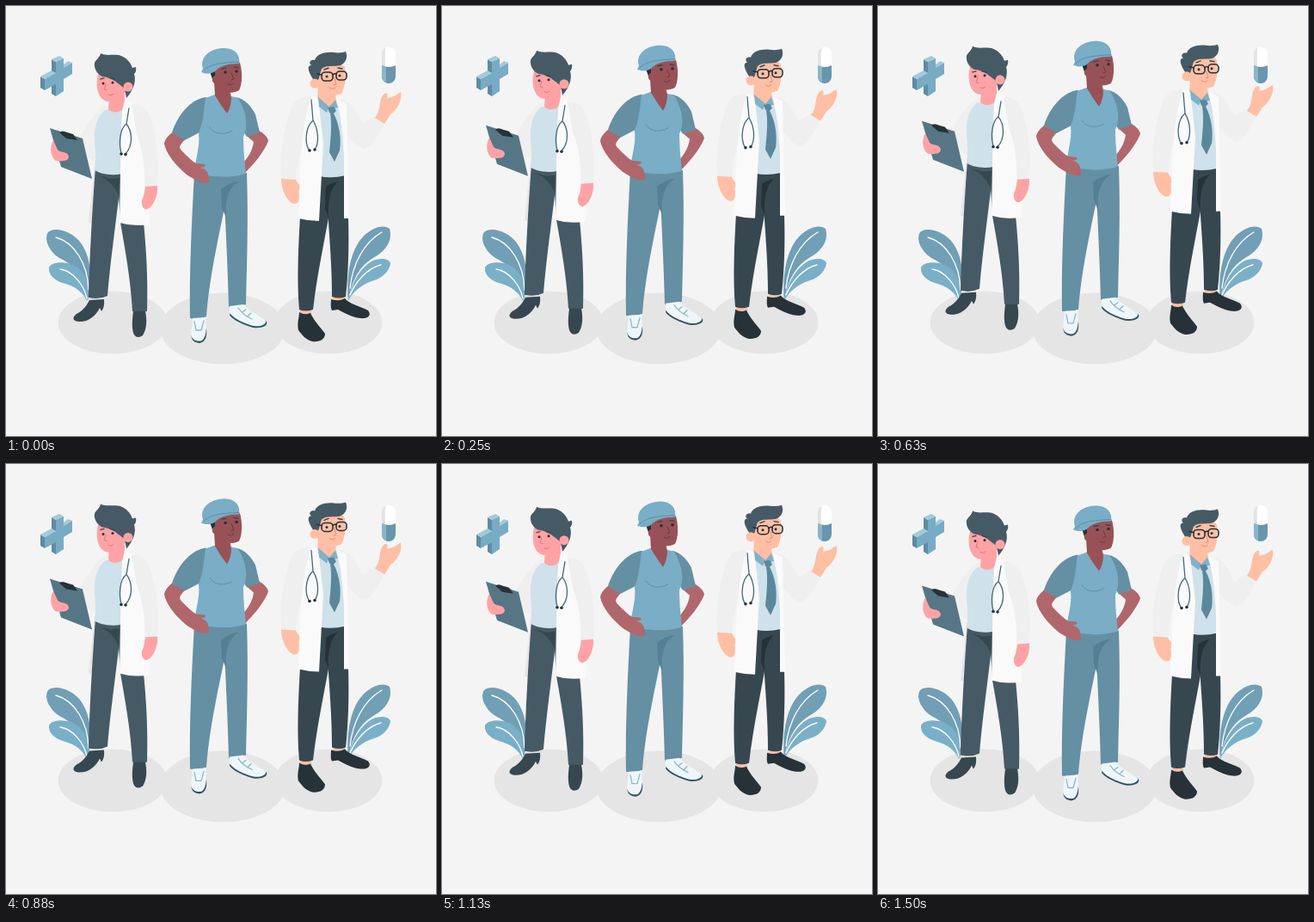
Animation, 500 px wide and 500 px high, one loop 1540 ms. Source, as an HTML page:

```html
<!DOCTYPE html>
<html lang="en">
<head>
<meta charset="utf-8">
<title>Medical team</title>
<style>
  html, body { margin: 0; height: 100%; overflow: hidden; background: #f4f4f4; }
  svg { display: block; width: 100vw; height: 100vh; }
  .line { fill: none; stroke-linecap: round; stroke-linejoin: round; }
  .vein { stroke: #fff; stroke-width: 1.3; }
  .tube { stroke: #44697b; stroke-width: 1.3; }
  .ink { fill: #263238; }
  .pink { fill: #fea3a5; }
  .brown { fill: #985257; }
  .arm { fill: #b0676b; }
  .peach { fill: #ffbfa5; }
  .coat { fill: #fafafa; }
  .sleeve { fill: #efefef; }
  .slate { fill: #465a65; }
  .navy { fill: #37474f; }
  .scrub { fill: #7aadc6; }
  .denim { fill: #658fa3; }
  .shirt { fill: #cfe1ea; }
</style>
</head>
<body>
<svg viewBox="0 0 500 500">
  <g fill="#e5e5e5">
    <ellipse cx="124" cy="368" rx="63.500" ry="36.500"/>
    <ellipse cx="252" cy="375" rx="72.500" ry="41.500"/>
    <ellipse cx="375" cy="368" rx="62.500" ry="36.500"/>
  </g>

  <g id="plants" fill="#719fb5">
    <path d="M95 343C100 320 100 295 88 277C78 262 57 256 49 263C43 272 52 288 64 294C82 303 92 318 95 343Z"/>
    <path fill="#7aafc8" d="M94 343C100 325 92 308 78 301C66 296 52 298 50 304C49 312 56 319 66 322C82 326 90 334 94 343Z"/>
    <path d="M398 343C395 310 402 285 412 272C425 256 440 254 446 259C450 272 442 284 430 291C410 302 402 320 398 343Z"/>
    <path fill="#7aafc8" d="M398 343C402 320 412 305 425 297C436 292 445 294 447 299C446 308 438 316 428 319C412 324 402 334 398 343Z"/>
    <path class="line vein" d="M58 269C80 275 95 300 96 330M63 306C78 308 91 325 94 340M437 263C416 275 403 300 400 328M436 301C420 305 407 320 400 336"/>
  </g>

  <g id="cross">
    <path fill="#5d8ca3" d="M53 62L58 65V78L53 76ZM40 82L45 85V98L40 95V82ZM53 91L58 90V105L53 102Z"/>
    <path fill="#a3cadb" d="M53 62L62 58L67 61L58 65ZM40 82L53 75L58 78L45 85ZM67 72L67 68L72 64L77 66Z"/>
    <path fill="#78abc4" d="M58 65L67 61V72L77 66V79L67 85V99L58 105V91L45 98V85L58 78Z"/>
  </g>

  <g id="pill">
    <path fill="#fff" d="M437 72V56A8 8 0 0 1 453 56V72Z"/>
    <path fill="#e1e3e4" d="M437 70V56Q437 50 442 49Q440 52 441 71Z"/>
    <path fill="#6796ad" d="M437 69Q445 73 453 69V82A8 8 0 0 1 437 82Z"/>
    <path fill="#8ab6ca" d="M437 69L442 71V89Q437 87 437 82Z"/>
  </g>

  <g class="person">
    <path fill="#e5e5e5" d="M103 185L96 252L104 255L112 195Z"/>
    <path class="slate" d="M104 188L134 190L132 215C127 258 121 300 118 337Q108 342 96 339C97 300 100 240 104 188Z"/>
    <path class="slate" d="M120 193L152 190C160 240 166 300 164 355Q155 357 147 355C145 318 138 280 133 252L130 205Z"/>
    <path class="navy" d="M108 197L121 201L132 200L131 220Q124 204 108 197Z"/>
    <path class="navy" d="M97 342L114 341Q115 350 111 355L109 351C104 361 95 368 84 367C77 366 77 362 82 358C90 354 94 348 97 342ZM148 355L162 355C164 365 164 375 159 383C155 386 150 386 148 380C146 372 147 363 148 355Z"/>
    <path class="sleeve" d="M119 115C108 117 100 130 86 152L93 175L104 182L113 150Z"/>
    <path class="shirt" d="M115 121L142 116L135 195C122 198 110 195 103 191C106 172 102 160 103 148C104 136 108 127 115 121Z"/>
    <path class="pink" d="M120 106L138 102L138 117C133 125 123 125 119 120Z"/>
    <path class="coat" d="M138 109L156 118L166 200L167 254Q148 257 132 252C133 210 133 160 135 122Z"/>
    <path class="sleeve" d="M146 114C158 114 166 121 169 134C175 155 179 180 176 209L161 211C162 190 159 165 152 150Z"/>
    <path class="pink" d="M162 210L176 209C177 220 172 232 165 236C160 238 157 232 158 226C161 220 161 215 162 210Z"/>
    <path class="line tube" d="M143 119L140 137C132 143 131 160 134 171M140 137C147 146 148 162 139 172"/>
    <circle class="ink" cx="134" cy="172" r="1.800"/><circle class="ink" cx="139" cy="172.500" r="1.800"/>
    <path fill="#567686" d="M51 142L89 154L100 201L64 187Z"/>
    <path class="ink" d="M62 147Q65 144 71 147L78 149L83 156L70 154Z"/>
    <path class="pink" d="M55 156C50 165 52 176 58 180C66 181 73 180 73 175C71 168 63 171 60 167Z"/>
    <path class="pink" d="M108 76C106 82 105 88 106 95C107 104 112 111 119 111C128 110 136 106 140 98L139 76Z"/>
    <path class="slate" d="M110 55C117 59 126 55 134 58C141 61 145 66 147 72L151 71Q152 76 149 79C152 89 147 99 140 107L138 96L133 92C128 88 122 83 112 82C106 79 102 73 103 66C105 62 109 60 110 55Z"/>
    <circle class="pink" cx="142" cy="94" r="5.500"/>
    <path class="line" stroke="#37474f" stroke-width="1.300" d="M110 85l4-1M121 84l5 1"/>
    <path class="line" stroke="#d87980" d="M116 91l-2 6 3 1M119 103q4 2 6-1"/>
    <circle class="ink" cx="113" cy="90" r="1.500"/><circle class="ink" cx="124" cy="89" r="1.500"/>
  </g>

  <g class="person">
    <path class="arm" d="M291 143C298 147 304 151 305 157C300 170 288 184 278 194L277 181C284 173 287 165 288 158L280 151Z"/>
    <path class="denim" d="M266 106C278 107 286 118 290 126L295 147L280 152L272 140Z"/>
    <path class="denim" d="M219 194L258 198L256 224C249 262 237 310 233 361Q224 365 214 363C213 310 216 250 219 194Z"/>
    <path class="denim" d="M248 196L280 194C282 250 280 300 279 347Q269 351 259 350C258 310 256 270 254 225Z"/>
    <path fill="#557f94" d="M271 204Q260 205 250 213L251 234L256 246Q253 214 271 204Z"/>
    <path fill="#315365" d="M216 378L233 376C234 384 232 391 225 392C217 391 214 387 216 378ZM261 356L303 367C305 372 297 375 288 374C276 371 262 364 260 359Z"/>
    <path fill="#eff6f9" d="M217 363L232 362C233 372 234 384 228 389C222 391 216 388 215 382C215 376 217 370 217 363ZM260 349L276 347C284 356 296 360 302 367C302 371 295 373 288 372C276 369 262 362 260 356Z"/>
    <path class="line" stroke="#8cb8cc" stroke-width="1.300" d="M219 367l2 10h6l3-11M270 351q5 8 16 13M275 356l4-3M281 361l4-4"/>
    <path class="denim" d="M233 106C215 108 200 126 193 147Q200 153 206 157L229 145Z"/>
    <path class="scrub" d="M232 107L243 103L257 123L262 105L270 107C276 118 284 135 276 152C276 170 278 184 279 195C262 200 242 200 219 194C220 178 226 164 224 148C231 130 230 116 232 107Z"/>
    <path class="line" stroke="#5f91aa" d="M237 141C241 149 253 151 263 145"/>
    <path class="brown" d="M242 88L260 98L262 106Q262 117 257 125Q250 116 243 104Z"/>
    <path class="arm" d="M193 147L207 156C203 162 200 163 204 168C211 175 216 180 221 183L231 184Q234 187 226 188C235 190 236 196 236 205C226 207 218 201 210 196C198 186 186 172 184 160C185 154 190 150 193 147Z"/>
    <path class="ink" d="M237 76L245 72L247 87L241 88Z"/>
    <path class="brown" d="M243 72C250 67 262 64 272 66C275 76 275 91 271 98C264 102 256 101 249 98L245 91C239 90 238 83 243 81Z"/>
    <path class="scrub" d="M230 78L227 77L229 73C225 60 236 50 252 49C266 48 273 57 271 67C258 67 248 70 243 76C239 79 233 79 230 78Z"/>
    <path class="line" stroke="#5d8fa8" d="M230 75C238 67 250 66 271 65"/>
    <path class="line" stroke="#37474f" stroke-width="1.300" d="M251 73l5-1M265 71l5 1"/>
    <path class="line" stroke="#673b42" d="M262 78l3 7-3 1M258 91q4 2 7-1"/>
    <circle class="ink" cx="255" cy="77" r="1.800"/><circle class="ink" cx="268" cy="76" r="1.800"/>
  </g>

  <g class="person">
    <path class="peach" d="M342 350h13v8h-13zM380 335h14v7h-14z"/>
    <path class="navy" d="M366 198L393 196L378 230C371 270 362 310 357 353Q348 356 341 353C338 320 340 280 342 244Z"/>
    <path class="navy" d="M372 200L393 196L398 246C399 280 398 310 395 338Q388 341 379 338C379 300 376 270 374 235Z"/>
    <path fill="#263238" d="M386 204Q378 206 372 210L371 236L375 246Q373 216 386 204Z"/>
    <path class="ink" d="M341 356Q347 360 354 357C358 366 366 374 371 381C371 388 364 391 356 390C348 388 344 382 340 377C338 369 341 362 341 356ZM378 341Q387 344 394 340C400 347 412 349 421 354C426 360 420 364 412 363C402 362 392 356 386 353L379 354C377 350 378 345 378 341Z"/>
    <path class="sleeve" d="M357 106C345 103 335 108 331 120C322 145 318 175 320 201Q328 205 337 203C338 180 346 160 350 140Z"/>
    <path class="peach" d="M320 201L337 202C340 208 345 212 344 217L340 214C342 222 342 230 335 230C327 228 320 214 320 201Z"/>
    <path class="shirt" d="M361 106L387 108L395 197Q378 201 365 198Z"/>
    <path class="sleeve" d="M386 108C399 110 406 118 414 137L429 128Q438 130 439 138C432 152 424 165 417 166C408 164 402 156 397 150Z"/>
    <path class="coat" d="M384 107L396 114L399 247L393 247L393 150Z"/>
    <path class="coat" d="M355 105C342 140 342 200 340 247Q352 250 364 250L369 160L363 106Z"/>
    <path class="peach" d="M429 130C436 122 433 112 438 104C441 100 445 100 443 107C449 107 454 103 459 100C461 108 456 120 447 126L440 137Z"/>
    <path class="peach" d="M363 94L383 101L384 112L374 119L362 108Z"/>
    <path fill="#80b1c8" d="M363 106L376 117L373 124L364 117ZM383 109L386 118L380 120L376 117Z"/>
    <path fill="#5a879c" d="M374 118L381 117L384 122L380 126L376 124ZM377 125L381 125C388 138 390 155 388 168L382 181L376 170C378 150 379 137 377 125Z"/>
    <path class="line tube" d="M355 109L357 133C347 142 348 160 352 167M357 133C364 145 364 160 359 167"/>
    <circle class="ink" cx="353" cy="168" r="1.800"/><circle class="ink" cx="359" cy="167" r="1.800"/>
    <path class="peach" d="M364 80C364 72 370 68 378 68C386 70 393 66 394 72C396 82 394 95 390 102C382 105 374 104 368 101L362 95Z"/>
    <path class="slate" d="M357 85C352 77 349 69 355 69C351 65 355 62 359 63C361 56 371 53 381 54C387 55 392 54 395 53C398 60 395 66 389 69C381 71 373 68 367 73C365 78 365 83 362 88Z"/>
    <circle class="peach" cx="359" cy="90" r="5.500"/>
    <path class="line" stroke="#37474f" stroke-width="1.400" d="M370 74l5-2M386 72l5 1"/>
    <g class="line" stroke="#263238" stroke-width="1.600">
      <rect x="367" y="77" width="13" height="10" rx="4"/>
      <rect x="384" y="76" width="12" height="10" rx="4"/>
      <path d="M380 80q2-2 4-1M367 80l-5-1"/>
    </g>
    <path class="line" stroke="#e28e73" d="M382 84l2 7-3 1M376 95q4 3 7 0"/>
    <circle class="ink" cx="373" cy="82" r="1.500"/><circle class="ink" cx="388" cy="81" r="1.500"/>
  </g>
</svg>
<script>
  const LOOP = 1540, RISE = 10;
  const people = document.querySelectorAll('.person');

  function draw() {
    const phase = performance.now() % LOOP / LOOP;
    const lift = RISE * (1 - Math.abs(1 - 2 * phase));
    people.forEach(p => p.setAttribute('transform', `translate(0 ${-lift})`));
    requestAnimationFrame(draw);
  }
  draw();
</script>
</body>
</html>
```
